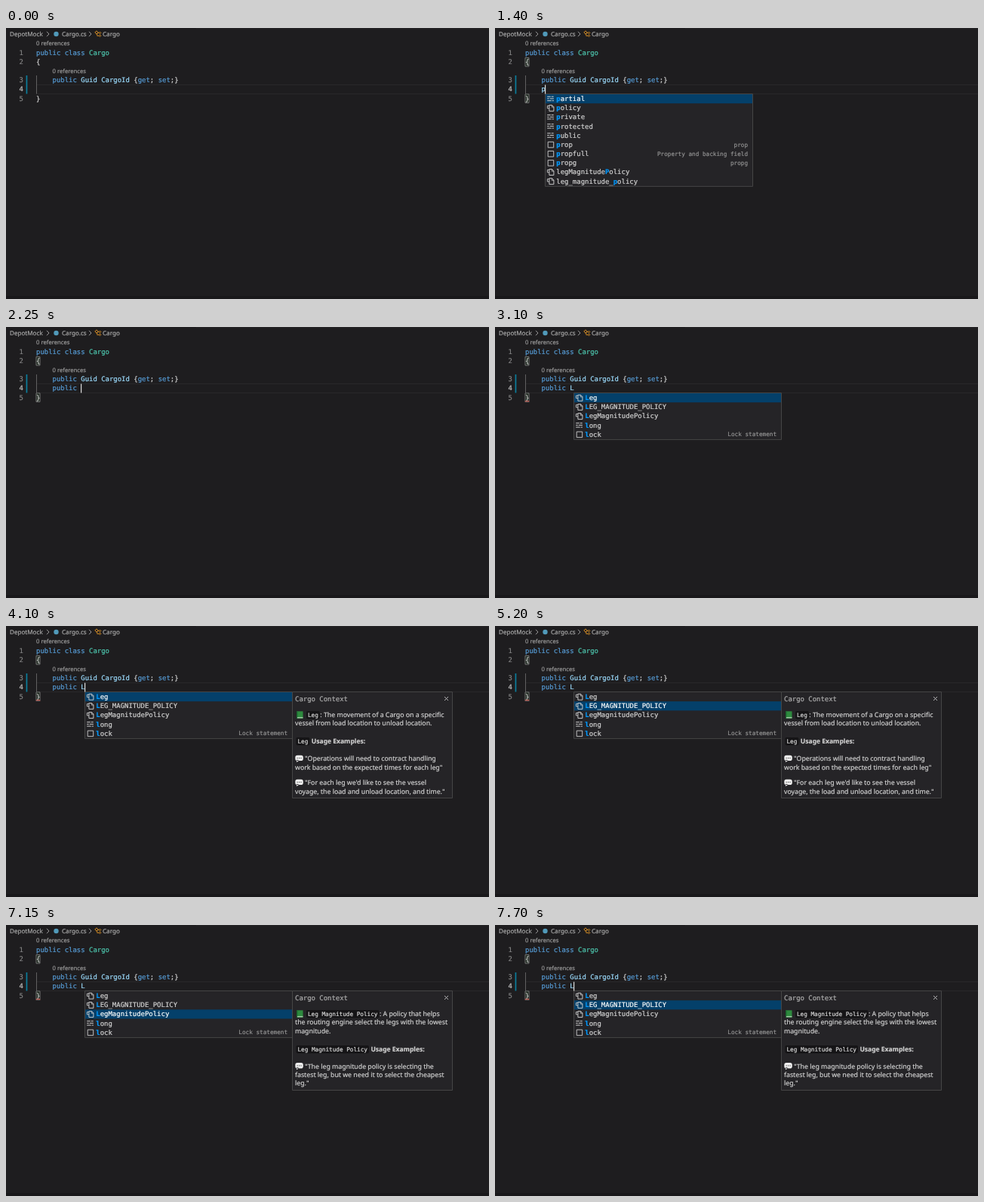
Recreate the animation shown at these times as an HTML page with a canvas. Size 640 px wide and 360 px high, loop 8 s.

```html
<!DOCTYPE html>
<html lang="en">
<head>
<meta charset="utf-8">
<title>Code editor</title>
<style>
html, body { margin: 0; width: 100%; height: 100%; overflow: hidden; background: #1e1d1f; }
canvas { display: block; width: 640px; height: 360px; }
</style>
</head>
<body>
<canvas id="stage"></canvas>
<script>
const LOOP = 8000;
const MONO = '"DejaVu Sans Mono", monospace';
const SANS = '"Noto Sans", "Open Sans", sans-serif';
const CODE = '8.95px ' + MONO, SMALL = '7.68px ' + MONO, DOC = '8.75px ' + SANS;
const CW = 5.388, ROW = 12.16, LEFT = 40;
const LINES = [36, 48, 72, 84, 97];
const BLUE = '#569cd6', PALE = '#9cdcfe', TEAL = '#4ec9b0', TEXT = '#d4d4d4', HIT = '#0097fb';

const canvas = document.getElementById('stage');
const ctx = canvas.getContext('2d');
const dpr = window.devicePixelRatio || 1;
canvas.width = 640 * dpr;
canvas.height = 360 * dpr;

// what has been typed on line 4, by start time
const typed = [[0, ''], [1350, 'p'], [1500, 'pu'], [1650, 'pub'], [1800, 'publ'],
  [1950, 'publi'], [2050, 'public'], [2200, 'public '], [2600, 'public L']];
const caretTimes = [[0, 0], [450, 1], [950, 0], [1350, 1], [3100, 0], [3600, 1], [4150, 0],
  [4600, 1], [5100, 0], [5600, 1], [6100, 0], [6600, 1], [7100, 0], [7600, 1]];
const picks = [[0, 0], [5200, 1], [6250, 2], [7500, 1]];

const allP = [
  ['key', 'partial', [0]], ['ref', 'policy', [0]], ['key', 'private', [0]],
  ['key', 'protected', [0]], ['key', 'public', [0]], ['snip', 'prop', [0], 'prop'],
  ['snip', 'propfull', [0], 'Property and backing field'], ['snip', 'propg', [0], 'propg'],
  ['ref', 'legMagnitudePolicy', [12]], ['ref', 'leg_magnitude_policy', [14]]
];
const allL = [
  ['ref', 'Leg', [0]], ['ref', 'LEG_MAGNITUDE_POLICY', [0]], ['ref', 'LegMagnitudePolicy', [0]],
  ['key', 'long', [0]], ['snip', 'lock', [0], 'Lock statement']
];

const legDoc = {
  h: 141, term: 'Leg', headY: 156,
  lead: [': The movement of a Cargo on a specific', 'vessel from load location to unload location.'],
  quotes: [
    [179.2, '"Operations will need to contract handling', 'work based on the expected times for each leg"'],
    [211.2, '"For each leg we\'d like to see the vessel', 'voyage, the load and unload location, and time."']
  ]
};
const policyDoc = {
  h: 132, term: 'Leg Magnitude Policy', headY: 168,
  lead: [': A policy that helps', 'the routing engine select the legs with the lowest', 'magnitude.'],
  quotes: [[190.6, '"The leg magnitude policy is selecting the', 'fastest leg, but we need it to select the cheapest', 'leg."']]
};

function at(keys, t) {
  let v = keys[0][1];
  for (const [start, value] of keys) if (t >= start) v = value;
  return v;
}

function rect(x, y, w, h, color) {
  ctx.fillStyle = color;
  ctx.fillRect(x, y, w, h);
}

function frame(x, y, w, h, color, width = 1) {
  ctx.strokeStyle = color;
  ctx.lineWidth = width;
  ctx.strokeRect(x, y, w, h);
}

function path(points, color, width = 1, x = 0, y = 0) {
  ctx.strokeStyle = color;
  ctx.lineWidth = width;
  ctx.beginPath();
  points.forEach(([a, b], i) => i ? ctx.lineTo(x + a, y + b) : ctx.moveTo(x + a, y + b));
  ctx.stroke();
}

// the thin stroke gives the letters a slightly heavier weight
function text(s, x, y, font, color, align = 'left') {
  ctx.font = font;
  ctx.fillStyle = ctx.strokeStyle = color;
  ctx.lineWidth = 0.2;
  ctx.textAlign = align;
  ctx.fillText(s, x, y);
  ctx.strokeText(s, x, y);
}

function code(parts, col, y) {
  for (const [s, color] of parts) {
    text(s, LEFT + col * CW, y, CODE, color);
    col += s.length;
  }
}

function diamond(x, y, r, color) {
  path([[0, -r], [r, 0], [0, r], [-r, 0], [0, -r]], color, 0.9, x, y);
}

function breadcrumb() {
  const font = '8.1px ' + SANS, gray = '#a9a9a9', orange = '#ee9d28';
  text('DepotMock', 5, 11, font, gray);
  text('Cargo.cs', 74, 11, font, gray);
  text('Cargo', 128, 11, font, gray);
  for (const x of [54, 110]) path([[0, 4.8], [3, 8], [0, 11.2]], gray, 0.9, x);
  ctx.fillStyle = '#519aba';
  ctx.beginPath();
  ctx.arc(66.5, 8, 3.2, 0, 7);
  ctx.fill();
  diamond(120, 6, 2.2, orange);
  path([[122, 6.3], [123, 6.3]], orange, 0.8);
  path([[120.8, 7], [120.8, 10.4], [123, 10.4]], orange, 0.8);
  diamond(124.5, 6.5, 1.3, orange);
  diamond(124.5, 10.3, 1.3, orange);
}

function editor(line, t) {
  rect(0, 0, 640, 360, '#1e1d1f');
  rect(252, 0, 388, 1, '#252426');
  rect(0, 356, 640, 4, '#19181a');
  breadcrumb();

  rect(LEFT, 75, 600, 1, '#29282a');
  rect(LEFT, 87, 600, 1, '#29282a');
  rect(26.6, 63, 1.7, 24.5, '#0c7d9d');
  rect(40, 63, 1, 24.5, '#606060');

  const lens = '7.7px ' + SANS;
  text('0 references', 40, 23, lens, '#999');
  text('0 references', 61.5, 60, lens, '#999');

  LINES.forEach((y, i) => text(i + 1, 23, y, CODE, i === 3 ? '#c6c6c6' : '#858585', 'right'));

  if (t >= 450) {
    for (const y of [39.5, 87.9]) {
      rect(40, y, 5, 11.5, '#1c261d');
      frame(40, y, 5, 11.5, '#888', 0.8);
    }
  }
  code([['public class ', BLUE], ['Cargo', TEAL]], 0, LINES[0]);
  code([['{', TEXT]], 0, LINES[1]);
  code([['public ', BLUE], ['Guid CargoId ', PALE], ['{', TEXT], ['get', BLUE], ['; ', TEXT],
    ['set', BLUE], [';}', TEXT]], 4, LINES[2]);
  code([['}', TEXT]], 0, LINES[4]);

  const word = line.slice(0, 7), whole = line.startsWith('public');
  code([[word, whole ? BLUE : PALE], [line.slice(7), PALE]], 4, LINES[3]);
  if (t >= 2900) path([[40, 99.3], [41.3, 97.9], [42.6, 99.3], [43.9, 97.9], [45.2, 99.3]], '#e0453c', 0.9);
}

function icon(kind, x, y) {
  const c = '#d0d0d0';
  if (kind === 'snip') {
    frame(x + 1.5, y + 2.5, 7.5, 7.5, c, 0.9);
  } else if (kind === 'key') {
    const bars = [[0.5, 2.7, 4.5], [6, 2.7, 3], [0.5, 5.4, 2.5], [4, 5.4, 5.2], [0.5, 8.1, 5.5], [7, 8.1, 2.2]];
    for (const [dx, dy, w] of bars) rect(x + dx, y + dy, w, 1, c);
  } else {
    path([[3.2, 2.3], [6.9, 2.3], [9.2, 4.6], [9.2, 10.2], [3.2, 10.2], [3.2, 2.3]], c, 0.95, x, y);
    path([[6.6, 2.3], [6.6, 4.9], [9.2, 4.9]], c, 0.8, x, y);
    path([[3.2, 3.2], [0.7, 3.2], [0.7, 6.6], [3.2, 6.6]], c, 0.9, x, y);
  }
}

function popup(rows, x, pick) {
  const top = 88, w = 275, h = rows.length * ROW + 0.8;
  rect(x, top, w, h, '#252427');
  rows.forEach(([kind, name, hits, detail], i) => {
    const y = top + i * ROW;
    if (i === pick) rect(x, y, w, ROW, '#04406a');
    icon(kind, x + 2.2, y);
    [...name].forEach((ch, n) => {
      const hit = hits.includes(n);
      text(ch, x + 14.8 + n * CW, y + 9.1, (hit ? 'bold ' : '') + CODE, hit ? HIT : i === pick ? '#fff' : TEXT);
    });
    if (detail) text(detail, x + w - 6.5, y + 8.8, SMALL, '#929292', 'right');
  });
  frame(x, top - 0.5, w, h + 0.5, '#454545');
}

function chip(s, x, y) {
  const w = s.length * 4.62;
  ctx.fillStyle = '#151416';
  ctx.beginPath();
  ctx.roundRect(x - 2, y - 8, w + 4, 10.4, 1.8);
  ctx.fill();
  text(s, x, y, SMALL, '#d8d8d8');
}

function book(x, y) {
  rect(x, y, 8.5, 9.6, '#2e8b3e');
  rect(x, y, 1.4, 9.6, '#1c6530');
  rect(x + 1, y + 8, 7.5, 1, '#d5ddd3');
}

function bubble(x, y) {
  ctx.fillStyle = '#eeeeee';
  ctx.beginPath();
  ctx.roundRect(x, y, 10.5, 7.4, 2.8);
  ctx.moveTo(x + 2, y + 6);
  ctx.lineTo(x + 1.6, y + 9.4);
  ctx.lineTo(x + 5.2, y + 7);
  ctx.fill();
  for (let i = 0; i < 3; i++) rect(x + 2.3 + i * 2.4, y + 3.2, 1.2, 1.2, '#555');
}

function docs(d) {
  const x = 383, c = '#d0d0d0', step = 11.4, top = 121;
  rect(379.5, 87.5, 212, d.h, '#252427');
  frame(379.5, 87.5, 212, d.h, '#454545');
  text('Cargo Context', x, 99.6, CODE, '#b0b0b0');
  path([[581, 94], [586, 99]], '#c5c5c5', 0.9);
  path([[586, 94], [581, 99]], '#c5c5c5', 0.9);

  book(385, 113.3);
  chip(d.term, 400, top);
  const end = d.term.length * 4.62;
  d.lead.forEach((s, i) => text(s, i ? x : 402.5 + end, top + i * step, DOC, c));

  chip(d.term, 386.5, d.headY);
  text('Usage Examples:', 391 + end, d.headY, 'bold 8.5px ' + SANS, c);

  for (const [y, ...lines] of d.quotes) {
    bubble(383.3, y - 7.5);
    lines.forEach((s, i) => text(s, i ? x : 396, y + i * step, DOC, c));
  }
}

function suggestions(line, t) {
  if (line === 'public L') return t >= 2650 ? allL : null;
  if (!line || line === 'public ' || t < 1400) return null;
  if (line === 'p') return allP;
  const hits = [...line].map((_, i) => i);
  const rows = [['key', 'public', hits]];
  if (line === 'pu') rows.push(['snip', 'propfull', [0, 5], 'Property and backing field']);
  return rows;
}

function draw(t) {
  ctx.setTransform(dpr, 0, 0, dpr, 0, 0);
  ctx.textBaseline = 'alphabetic';
  ctx.textRendering = 'geometricPrecision';
  ctx.lineJoin = 'round';
  const line = at(typed, t);
  const caretX = LEFT + (4 + line.length) * CW;
  editor(line, t);
  const rows = suggestions(line, t);
  if (rows) popup(rows, Math.floor(caretX) + 0.5, at(picks, t));
  if (t >= 4100) docs(t < 5350 ? legDoc : policyDoc);
  if (at(caretTimes, t)) rect(Math.floor(caretX), 75.5, 1.2, 12, '#dddddd');
}

const start = performance.now();
function tick() {
  draw((performance.now() - start) % LOOP);
  requestAnimationFrame(tick);
}
tick();
</script>
</body>
</html>
```
